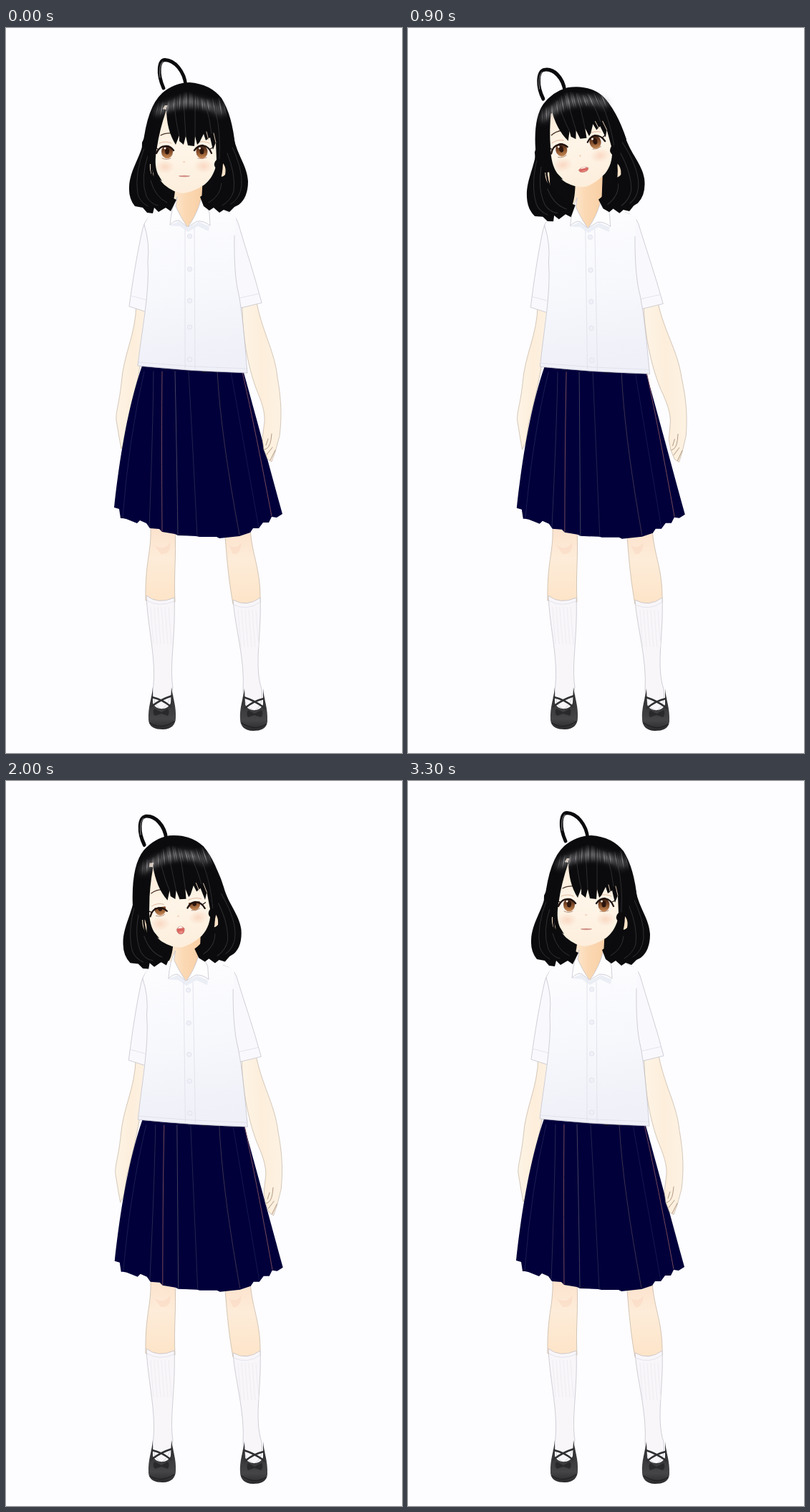
Write an HTML page that moves like this. It is 553 by 1013 pixels and loops after 3400 ms.

```html
<!DOCTYPE html>
<html lang="en">
<head>
<meta charset="utf-8">
<title>Swaying girl</title>
<style>
html, body { margin: 0; width: 100%; height: 100%; overflow: hidden; background: #fdfcfe; }
svg { display: block; width: 100%; height: 100%; }
.line { fill: none; stroke-linecap: round; stroke-linejoin: round; }
.skin { stroke: #b8a894; stroke-width: .6; }
.cloth { stroke: #bdbcc6; stroke-width: .7; }
.seam { fill: none; stroke: #dedfe9; stroke-width: .8; }
</style>
</head>
<body>
<svg viewBox="0 0 553 1013">
<defs>
  <linearGradient id="shirtFill" x1="0" y1="0" x2=".1" y2="1">
    <stop offset="0" stop-color="#fdfdff"/><stop offset=".55" stop-color="#f7f8fc"/><stop offset="1" stop-color="#eff0f8"/>
  </linearGradient>
  <linearGradient id="armFill" x1="0" x2="1">
    <stop offset="0" stop-color="#fdf4e6"/><stop offset=".5" stop-color="#fdeedb"/><stop offset="1" stop-color="#fdf2e3"/>
  </linearGradient>
  <linearGradient id="legFill" x1="0" y1="0" x2="0" y2="1">
    <stop offset="0" stop-color="#fce2cd"/><stop offset=".4" stop-color="#fdecd9"/><stop offset="1" stop-color="#fde4c8"/>
  </linearGradient>
  <linearGradient id="neckFill" x1="0" x2="1">
    <stop offset="0" stop-color="#fdebd6"/><stop offset=".4" stop-color="#fbd9b4"/><stop offset="1" stop-color="#f8cda2"/>
  </linearGradient>
  <linearGradient id="faceFill" x1="0" y1="0" x2="0" y2="1">
    <stop offset="0" stop-color="#fde9d5"/><stop offset=".5" stop-color="#fef5e8"/><stop offset="1" stop-color="#fdeedc"/>
  </linearGradient>
  <linearGradient id="irisFill" x1="0" y1="0" x2="0" y2="1">
    <stop offset="0" stop-color="#2d160d"/><stop offset=".45" stop-color="#7b4727"/><stop offset="1" stop-color="#c98a55"/>
  </linearGradient>
  <radialGradient id="blush">
    <stop offset="0" stop-color="#f6bfa4" stop-opacity=".5"/><stop offset="1" stop-color="#f6bfa4" stop-opacity="0"/>
  </radialGradient>
  <linearGradient id="gloss" x1="0" y1="0" x2="0" y2="1">
    <stop offset="0" stop-color="#fff" stop-opacity="0"/><stop offset=".55" stop-color="#dcdce0" stop-opacity=".5"/><stop offset="1" stop-color="#fff" stop-opacity="0"/>
  </linearGradient>
  <linearGradient id="shoeFill" x1="0" y1="0" x2="0" y2="1">
    <stop offset="0" stop-color="#29292b"/><stop offset=".75" stop-color="#454548"/><stop offset="1" stop-color="#29292b"/>
  </linearGradient>
  <filter id="soft" x="-20%" y="-100%" width="140%" height="300%"><feGaussianBlur stdDeviation="4"/></filter>
  <clipPath id="open"><rect id="lid" x="200" width="100" height="40"/></clipPath>
  <g id="shoe">
    <path d="M205 921C204 936 198 948 199 967C200 977 208 980 219 980C231 980 237 973 237 964C238 948 233 936 231 921L230 943C226 954 209 954 205 943Z" fill="url(#shoeFill)"/>
    <path class="line" d="M204 935Q218 938 230 948M232 933Q216 938 203 948" stroke="#303032" stroke-width="2.6"/>
    <path d="M217 956L207 951Q204 957 208 961L217 958L226 961Q229 956 226 951Z" fill="#29292b"/>
    <path class="line" d="M201 971Q217 981 235 969" stroke="#202022" stroke-width="1.3"/>
  </g>
</defs>

<g id="hairBack"><path d="M215 105Q255 70 298 105L320 170L322 235Q300 254 276 250L232 250Q205 256 188 235L190 160Z" fill="#0c0c0e"/></g>

<g id="legs">
  <path class="skin" fill="url(#legFill)" d="M202 698C203 735 194 745 195 800L236 802C234 765 238 740 236 700Z"/>
  <path class="skin" fill="url(#legFill)" d="M305 700C309 745 310 765 317 805L355 803C356 755 344 740 341 700Z"/>
  <path d="M207 722Q220 732 229 719Q231 736 216 735ZM311 722Q320 730 329 719Q327 737 317 735Z" fill="#f8cfb8" opacity=".4"/>
  <path class="cloth" fill="#f8f6f9" d="M196 793Q212 806 235 796C237 850 228 890 233 921Q229 946 217 952Q205 947 205 926C211 885 198 840 196 793Z"/>
  <path class="cloth" fill="#f8f6f9" d="M317 799Q336 810 355 796C357 850 346 890 357 924Q360 947 347 954Q332 950 331 928C334 880 320 840 317 799Z"/>
  <path class="seam" d="M197 800Q213 810 235 801M318 806Q337 815 355 802"/>
  <g id="ribs"></g>
  <use href="#shoe"/>
  <use href="#shoe" transform="matrix(-1 0 0 1 564 2)"/>
</g>

<g id="torsoBack"><path id="armL" class="skin" fill="url(#armFill)" d="M182 385C181 430 164 455 161 497C158 525 153 537 154 548L158 572L161 588L166 578L170 550C180 510 188 480 199 390Z"/></g>

<g id="skirt">
  <path fill="#01003a" d="M190 472L331 478C347 535 367 610 386 679L378 684L371 683L367 691L359 691L353 699L345 699L341 705L326 710L298 713L294 711L270 711L266 710L240 709L236 707L218 704L214 700L201 699L196 692L187 688L183 692L168 686L163 685L160 685L158 672L151 670C157 615 168 535 190 472Z"/>
  <g id="pleats" class="line"></g>
  <path d="M274 481l3-4l2 4ZM290 481l3-4l2 4Z" fill="#111118"/>
</g>

<g id="torso">
  <g id="armR">
    <path class="skin" fill="url(#armFill)" d="M330 380C329 425 337 470 349 503C357 522 362 537 361 550L358 574L360 589L365 602L371 606L376 592L382 570C385 545 385 522 379 488C375 450 357 424 349 378Z"/>
    <path class="line" d="M361 589Q368 588 370 575L371 567M364 596L372 586M369 604L376 590M366 574L363 583" stroke="#a98f7b" stroke-width=".9"/>
  </g>
  <path fill="url(#neckFill)" d="M237 205L275 205L273 244L280 255L254 279L230 250Q237 240 237 205Z"/>
  <path class="cloth" fill="#f9f9fd" d="M209 257Q195 264 191 280C184 310 177 352 172 389L197 397L203 330Z"/>
  <path class="cloth" fill="#f9f9fd" d="M305 256Q320 260 324 272C335 310 347 345 357 384L324 392L316 330Z"/>
  <path class="seam" d="M174 374L200 381M323 378L354 371"/>
  <path fill="url(#shirtFill)" d="M231 250L206 258Q195 265 194 277L199 318C200 365 190 420 184 472Q260 480 337 482C333 435 330 405 325 370Q318 340 320 290L321 262L281 247L254 278Z"/>
  <path class="line cloth" d="M193 275Q201 300 198 326C201 370 189 425 184 472Q260 480 337 482C333 435 331 405 325 372Q318 345 319 290"/>
  <path class="seam" d="M185 467Q260 474 336 476M250 280L250 476M263 280L264 477"/>
  <path d="M228 276L242 270L254 279L269 271L284 277L283 284L268 277L254 285L243 277Z" fill="#e6e8f3" opacity=".7"/>
  <path class="cloth" fill="#fefeff" d="M239 236Q231 250 229 275Q236 268 242 269L253 278Q243 263 237 249ZM275 238L284 258L285 276Q276 269 267 270L254 278Q267 260 272 240Z"/>
  <g id="buttons" fill="#f0f1f8" stroke="#dadbe5" stroke-width=".7"></g>
</g>

<g id="face">
  <path d="M207 160C206 190 209 208 221 219Q234 230 247 231Q262 229 277 219C292 207 297 188 296 158L285 110L220 108Z" fill="url(#faceFill)"/>
  <ellipse cx="222" cy="194" rx="14" ry="10" fill="url(#blush)"/>
  <ellipse cx="276" cy="193" rx="14" ry="10" fill="url(#blush)"/>
  <path d="M247 188Q249 183 250 188Z" fill="#f5cdb4"/>
  <g clip-path="url(#open)">
    <path d="M213 173Q223 160 234 171Q234 182 224 183Q215 182 213 173ZM264 171Q274 160 286 173Q283 183 273 182Q265 181 264 171Z" fill="#f8f3ef"/>
    <g id="irises"></g>
  </g>
  <g id="lashes" class="line" stroke="#20120e">
    <path d="M210 175Q214 165 223 165Q230 165 234 171M263 171Q268 164 275 164Q284 166 287 175" stroke-width="2.3"/>
    <path d="M212 169L208 167M285 169L289 167" stroke-width="1.2"/>
    <path d="M214 161Q223 157 231 161M266 160Q276 157 284 161" stroke="#d9ac91" stroke-width=".8"/>
  </g>
  <path class="line" d="M218 182Q224 185 230 182M268 182Q274 184 280 181" stroke="#a57b67" stroke-width=".8"/>
  <path class="line" d="M216 150Q223 146 232 147M271 147Q280 146 287 150" stroke="#4d352c" stroke-width="1.3"/>
  <g transform="translate(249 207)">
    <path id="lips" fill="#d9665f" stroke="#c9978b" stroke-width=".7"/>
    <path id="teeth" fill="#fff8f4"/>
    <ellipse id="tongue" fill="#ee8d86"/>
  </g>
</g>

<g id="locks">
  <path fill="#0b0b0d" d="M215 104C202 117 196 137 193 155C188 181 173 198 172 222Q171 238 180 249L191 251L197 258L205 259L207 251L213 257L223 251L230 256L238 240C222 232 210 216 208 199L206 155Z"/>
  <path fill="#0b0b0d" d="M287 98C306 112 314 134 318 153C323 178 337 193 338 214Q338 237 325 247L319 250L312 257L304 254L298 258L290 251L284 255L276 249L271 236Q291 224 296 199L298 155Z"/>
  <path d="M201 190Q200 203 206 209L207 190ZM303 189Q308 195 306 205Q301 210 299 206Z" fill="#fde3c8"/>
  <path class="line" d="M204 182Q201 200 208 217M301 180Q303 197 298 213" stroke="#0b0b0d" stroke-width="2.5"/>
  <g class="line" stroke="#303034" stroke-width="1">
    <path d="M194 165Q179 203 184 232Q187 243 198 249M199 175Q187 210 196 235Q202 246 212 248M202 213Q208 236 225 244"/>
    <path d="M313 160Q331 196 329 220Q327 238 314 246M309 175Q321 205 318 228Q314 241 302 248M301 217Q300 234 283 244"/>
  </g>
</g>

<g id="crown">
  <g id="curl" class="line">
    <path d="M220 84C211 64 213 45 222 44.500C236 45 249 61 251 80" stroke="#0b0b0d" stroke-width="4.800"/>
    <path d="M215 69Q213 53 219 47" stroke="#66666b" stroke-width="1.300"/>
  </g>
  <path fill="#0b0b0d" d="M191 166Q197 110 218 91Q234 77 256 76Q285 78 301 98Q316 122 320 165Q312 170 304 164L290 112Q255 92 222 108Q208 127 203 165L199 182Z"/>
</g>
<g id="bangs">
  <path fill="#0b0b0d" d="M211 112L224 114Q214 144 211 166Q206 190 212 204L218 214L208 208Q198 188 203 153Z"/>
  <path fill="#0b0b0d" d="M224 112Q232 92 258 94Q292 96 304 125L306 183L301 193L296 206L290 216L293 196Q288 190 294 184L293 160L289 170L285 153L279 157L276 148L270 160L267 163L264 151L263 165L254 164L251 151L248 163L242 158L242 150L237 163Q224 143 224 112Z"/>
  <path class="line" d="M280 145L283 157M290 147L293 160" stroke="#e9cfb8" stroke-width=".9"/>
  <path class="line" d="M235 105Q237 132 242 150M248 101L251 151M264 101L264 151M278 105Q285 127 287 147M293 118Q300 145 298 183" stroke="#2d2d31" stroke-width="1"/>
</g>
<g id="shine">
  <path class="line" d="M212 117Q256 90 300 117" stroke="#88888c" stroke-width="11" opacity=".45" filter="url(#soft)"/>
  <g id="strands" fill="url(#gloss)"></g>
</g>
</svg>

<script>
const LOOP = 3400, STEP = 100;
const $ = id => document.getElementById(id);

function add(parent, tag, attrs) {
  const el = document.createElementNS('http://www.w3.org/2000/svg', tag);
  for (const key in attrs) el.setAttribute(key, attrs[key]);
  return $(parent).appendChild(el);
}

// Pleats: top x, middle x, bottom x, bottom y, colour.
[[193, 172, 163, 683, '#1c1c52'], [206, 205, 200, 697, '#292650'],
 [218, 217, 218, 703, '#73485a'], [236, 238, 240, 708, '#43405f'],
 [255, 260, 267, 710, '#24234f'], [295, 300, 326, 708, '#3b304f'],
 [314, 330, 353, 698, '#171650'], [330, 350, 371, 682, '#73485a']
].forEach(([top, mid, end, y, stroke]) =>
  add('pleats', 'path', { d: `M${top} 480Q${mid} 570 ${end} ${y}`, stroke, 'stroke-width': 1 }));

[291, 337, 381, 418, 463].forEach(cy => add('buttons', 'circle', { cx: 256.5, cy, r: 3.2 }));

for (let i = 0; i < 6; i++) {
  for (const [x, y] of [[202, 809], [324, 813]]) {
    add('ribs', 'path', { d: `M${x + i * 5} ${y}q2 30 4 52`, stroke: '#f1edf3', fill: 'none' });
  }
}

for (const cx of [225, 273.5]) {
  add('irises', 'ellipse', { cx, cy: 173, rx: 8, ry: 9.3, fill: 'url(#irisFill)' });
  add('irises', 'ellipse', { cx, cy: 172, rx: 3, ry: 4.5, fill: '#2b150d' });
  add('irises', 'circle', { cx: cx - 3, cy: 168, r: 1.5, fill: '#fff5e9' });
}

// Gloss strands fan out from the crown.
for (let i = 0; i < 34; i++) {
  const u = i / 33 * 2 - 1, wave = Math.sin(i * 12.9) * 4;
  const x = 257 + u * 44, y = 92 + u * u * 10 + wave, w = 1.3 + Math.abs(wave) * .35;
  add('strands', 'path', {
    d: `M${x} ${y}l${w} 0l${u * 5} ${23 - wave}l${-w * .6} 0Z`,
    opacity: .5 + .4 * Math.sin(i * 4.1)
  });
}

// time, tilt, crown x/y, face x/y, locks x/y, lean, arm swing, mouth half width, mouth height
const poses = [
  [0, 0, 0, 0, 0, 0, 0, 0, 0, 0, 7.5, 1.6],
  [400, -4, 2.5, 3.5, .8, -4.2, -1.7, 4, .4, .3, 5.5, 14],
  [900, -13, 2.5, 4, 2.5, -10.5, -5, 6, 1, 1, 7, 7],
  [1200, -13.7, -5.6, -3.5, 2.3, 4.2, -8.7, 2, 1, .3, 5.8, 13],
  [2000, -8.5, -4.5, -1, -1, .7, -7.7, 0, .9, .1, 5.6, 11],
  [2500, -5, 0, -.3, -.5, -.3, -4.5, 0, .6, .3, 7.5, 1.6],
  [3300, 0, 0, 0, 0, 0, 0, 0, 0, 0, 7.5, 1.6],
  [3400, 0, 0, 0, 0, 0, 0, 0, 0, 0, 7.5, 1.6]
];

function slope(i, c) {
  if (i === 0 || i >= poses.length - 2) return 0;
  const a = poses[i - 1], b = poses[i + 1];
  return (b[c] - a[c]) / (b[0] - a[0]);
}

function poseAt(t) {
  const i = Math.max(0, poses.findIndex(p => p[0] > t) - 1);
  const a = poses[i], b = poses[i + 1], span = b[0] - a[0], u = (t - a[0]) / span;
  return a.slice(1).map((v, k) => {
    const c = k + 1, d = b[c] - v;
    if (c > 9) return v + d * u;
    const m = slope(i, c) * span, n = slope(i + 1, c) * span;
    return v + m * u + (3 * d - 2 * m - n) * u * u + (m + n - 2 * d) * u ** 3;
  });
}

const set = (id, name, value) => $(id).setAttribute(name, value);
const turn = (id, x, y, angle) =>
  set(id, 'transform', `translate(${x} ${y}) rotate(${angle} 252 235)`);
// Horizontal shear that keeps the line at baseY in place, then a shift.
const shear = (id, k, baseY, x = 0, y = 0) =>
  set(id, 'transform', `matrix(1 0 ${k} 1 ${x - baseY * k} ${y})`);

function draw(t) {
  const [tilt, cx, cy, fx, fy, lx, ly, lean, swing, w, h] = poseAt(t);
  turn('crown', cx, cy, tilt);
  shear('curl', tilt * .0155, 82);
  turn('shine', (cx + fx) / 2, (cy + fy) / 2, tilt);
  turn('face', fx, fy, tilt);
  turn('bangs', fx, fy, tilt);
  turn('locks', lx, ly, tilt / 2);
  turn('hairBack', lx, ly, tilt / 2);

  for (const id of ['torso', 'torsoBack']) shear(id, .0138 * lean, 478, .5 * lean, 1.3 * lean);
  set('armL', 'transform', `rotate(${lean} 190 390)`);
  set('armR', 'transform', `rotate(${-1.4 * swing} 340 390)`);
  set('skirt', 'transform', `translate(${.8 * lean} ${.8 * lean})`);
  shear('pleats', -.01 * lean, 710);

  const top = -h / 2, bottom = h / 2, gap = Math.max(0, h - 4);
  set('lips', 'd', `M${-w} ${top * .3}Q0 ${top * 1.7} ${w} ${top * .3}Q${w * .9} ${bottom} 0 ${bottom}Q${-w * .9} ${bottom} ${-w} ${top * .3}Z`);
  set('teeth', 'd', gap ? `M${-w * .65} ${top * .5}Q0 ${top * 1.5} ${w * .65} ${top * .5}Z` : '');
  set('tongue', 'cy', bottom * .5);
  set('tongue', 'rx', gap ? w * .5 : 0);
  set('tongue', 'ry', gap * .22);

  const blink = Math.max(0, 1 - Math.abs(t - 2000) / 150) * 8;
  set('lid', 'y', 163 + blink);
  set('lashes', 'transform', `translate(0 ${blink * .85})`);
}

function tick() {
  draw(Math.floor(performance.now() % LOOP / STEP) * STEP);
  requestAnimationFrame(tick);
}
tick();
</script>
</body>
</html>
```
